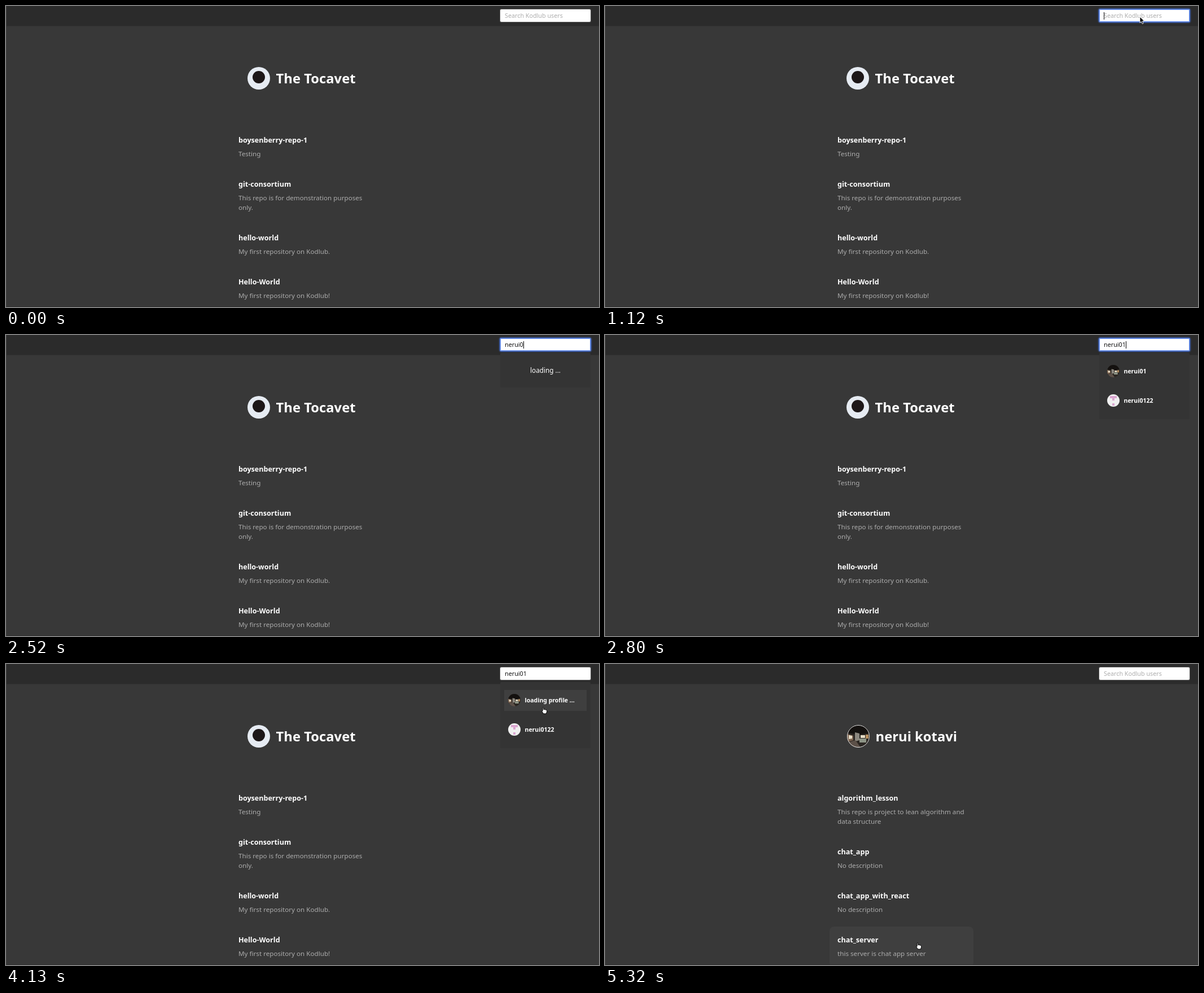
An HTML page for the animation above (5.39 s loop, 1051 by 533 pixels).

```html
<!DOCTYPE html>
<html lang="en">
<head>
<meta charset="utf-8">
<title>User search</title>
<style>
  * { box-sizing: border-box; }
  html, body { margin: 0; width: 100%; height: 100%; overflow: hidden; background: #383838; }
  #stage { position: relative; width: 1051px; height: 533px; overflow: hidden; background: #383838;
    color: #fff; font: 11.65px/17px "Noto Sans", "Open Sans", sans-serif; white-space: nowrap; }
  #stage::after { content: ""; position: absolute; inset: 0; border: solid #424242; border-width: 0 0 0 1px;
    box-shadow: inset 0 -1px #2f2f2f; }
  [hidden] { display: none !important; }
  .abs, header, h1, .face, .list, .search, .drop, .row { position: absolute; }

  header { left: 0; top: 0; width: 100%; height: 35px; background: #2b2b2b; box-shadow: 0 1px 1px rgba(0, 0, 0, .12); }
  h1 { margin: 0; top: 108px; font-size: 23.8px; line-height: 40px; font-weight: 700; }
  .face { top: 108px; width: 40px; height: 40px; }

  .list { left: 398px; top: 214px; width: 255px; }
  .repo { padding: 15px 14px 16px; margin-bottom: 6px; border-radius: 8px; color: #acacac; }
  .repo b { display: block; margin-bottom: 7px; color: #fff; font-size: 12.55px; }
  .repo p { position: relative; top: -.5px; margin: 0; }
  .hover { background: #3f3f3f; }

  .search { left: 876px; top: 6px; width: 160px; height: 22px; padding-left: 8px; border-radius: 2px;
    background: #fff; box-shadow: 0 0 0 1px rgba(255, 255, 255, .25); color: #111; font-size: 10.75px; line-height: 22px; }
  .search.focus { box-shadow: 0 0 0 1px #4a74d8, 0 0 2px 2px rgba(74, 116, 216, .6), inset 0 0 0 1px #6f93e6; }
  .hint { left: 8px; color: #adadad; }
  #caret { display: inline-block; width: 1px; height: 13px; vertical-align: -3px; background: #000; }

  .drop { left: 876px; top: 32px; width: 160px; border-radius: 2px; background: #343434; }
  #wait { height: 61px; line-height: 61px; text-align: center; font-size: 11.75px; }
  #found { height: 117px; }
  .row { left: 7px; width: 146px; height: 37px; padding-left: 36.5px; font-size: 10.5px; line-height: 36px; font-weight: 700; }
  .row svg { position: absolute; left: 7px; top: 7px; width: 22px; height: 22px; }
  #cursor { left: 0; top: 0; width: 14px; height: 18px; overflow: visible; z-index: 5; }
</style>
</head>
<body>
<svg width="0" height="0" style="position:absolute">
  <clipPath id="disc"><circle cx="20" cy="20" r="20"/></clipPath>
  <symbol id="street" viewBox="0 0 40 40">
    <g clip-path="url(#disc)">
      <path fill="#2b2622" d="M0 0h40v40H0z"/>
      <path fill="#14110f" d="M0 0h40v14L22 17 0 14z"/>
      <path fill="#8b877e" d="M14 13l8 2v12l-8 2z"/>
      <path fill="#7d6450" d="M0 16l11 3v8L0 30z"/>
      <path fill="#e6dcc6" d="M3 18l6 1v5l-6 1zM24 18h8v5h-8z"/>
      <path fill="#8d9486" d="M22 24h12v7H22z"/>
      <path fill="#b9905f" d="M33 17h5v7h-5z"/>
      <path fill="#5c5048" d="M0 31l15-4 9 13H0z"/>
    </g>
  </symbol>
</svg>

<div id="stage">
  <header></header>

  <main id="before">
    <svg class="face" style="left:428px" viewBox="0 0 40 40">
      <circle cx="20" cy="20" r="20" fill="#e6ebf2"/><circle cx="20" cy="18" r="11" fill="#1d1718"/>
    </svg>
    <h1 style="left:478.5px">The Tocavet</h1>
    <div class="list">
      <div class="repo"><b>boysenberry-repo-1</b><p>Testing</p></div>
      <div class="repo"><b>git-consortium</b><p>This repo is for demonstration purposes<br>only.</p></div>
      <div class="repo"><b>hello-world</b><p>My first repository on Kodlub.</p></div>
      <div class="repo"><b>Hello-World</b><p>My first repository on Kodlub!</p></div>
    </div>
  </main>

  <main id="after" hidden>
    <svg class="face" style="left:428.5px" viewBox="0 0 40 40">
      <use href="#street" width="40" height="40"/><circle cx="20" cy="20" r="19.5" fill="none" stroke="#e4e4e4"/>
    </svg>
    <h1 style="left:479.5px">nerui kotavi</h1>
    <div class="list">
      <div class="repo"><b>algorithm_lesson</b><p>This repo is project to lean algorithm and<br>data structure</p></div>
      <div class="repo"><b>chat_app</b><p>No description</p></div>
      <div class="repo"><b>chat_app_with_react</b><p>No description</p></div>
      <div class="repo"><b>chat_server</b><p>this server is chat app server</p></div>
    </div>
  </main>

  <div class="search" id="search"><span class="abs hint" id="hint">Search Kodlub users</span><span id="typed"></span><i id="caret"></i></div>

  <div class="drop" id="wait" hidden>loading ...</div>
  <div class="drop" id="found" hidden>
    <div class="row" style="top:14px"><svg><use href="#street" width="22" height="22"/></svg><span id="pick"></span></div>
    <div class="row" style="top:66px">
      <svg viewBox="0 0 22 22"><circle cx="11" cy="11" r="11" fill="#f0f0f0"/><path fill="#dba6d0" d="M5 3h12v4h-4v4H9V7H5zM9 16h4v4H9z"/></svg>nerui0122
    </div>
  </div>

  <svg class="abs" id="cursor" stroke-linejoin="round">
    <path id="arrow" fill="#000" stroke="#fff" stroke-width=".9" d="M0 0V10.8L2.5 8.5 4.3 12.6 6.2 11.8 4.5 7.8H8Z"/>
    <path id="hand" fill="#fff" stroke="#000" d="M-.9 2Q0 .4 .9 2V5.6Q2 4.6 2.8 5.8 4 5 4.6 6.2 6.4 5.6 6.6 7.4V9.6L5.4 13H.6L-2.4 8.6Q-2.6 7-.9 8.2Z"/>
  </svg>
</div>

<script>
const LOOP = 5390, TICK = 70;
const FOCUS = 840, BLUR = 3710, WAIT = 2310, FOUND = 2730, PICK = 4060, SWAP = 4410, BLINK = 490;
const word = "nerui01";
const keys = [1470, 1610, 1680, 1820, 2030, 2450, 2590];

// pointer stops: time, x, y
const path = [
  [70, 960, 13], [210, 954, 18], [350, 954, 18], [630, 948, 19], [3010, 948, 19], [3640, 952, 75],
  [4200, 952, 75], [4410, 779, 118], [4550, 779, 118], [4620, 704, 147], [4760, 608, 187],
  [4970, 608, 187], [5040, 592, 285], [5180, 560, 477], [5250, 560, 477], [5320, 554, 492]
];

const $ = id => document.getElementById(id);
const show = (id, on) => { $(id).hidden = !on; };
const targets = [...document.querySelectorAll(".repo, .row")];

function pointer(t) {
  const i = path.findIndex(p => p[0] > t);
  if (i < 1) return path[i < 0 ? path.length - 1 : 0].slice(1);
  const [t0, x0, y0] = path[i - 1], [t1, x1, y1] = path[i];
  const k = (t - t0) / (t1 - t0);
  return [x0 + (x1 - x0) * k, y0 + (y1 - y0) * k];
}

function inside(el, x, y) {
  const r = el.getBoundingClientRect();
  return x >= r.left && x < r.right && y >= r.top && y < r.bottom;
}

function render(t) {
  const count = t < SWAP ? keys.filter(k => k <= t).length : 0;
  const focus = t >= FOCUS && t < BLUR;
  const lastKey = count ? keys[count - 1] : FOCUS;

  show("before", t < SWAP);
  show("after", t >= SWAP);
  show("wait", t >= WAIT && t < FOUND);
  show("found", t >= FOUND && t < SWAP);
  show("hint", !count);
  $("typed").textContent = word.slice(0, count);
  $("pick").textContent = t < PICK ? word : "loading profile ...";
  $("search").classList.toggle("focus", focus);
  show("caret", focus && Math.floor((t - lastKey) / BLINK) % 2 === 0);

  const [x, y] = pointer(t);
  const visible = t >= TICK && (t < keys[0] || t >= 3010);
  let over = false;
  for (const el of targets) {
    const hit = visible && inside(el, x, y);
    el.classList.toggle("hover", hit);
    over = over || hit;
  }
  $("cursor").style.display = visible ? "" : "none";
  $("cursor").style.transform = `translate(${x}px, ${y}px)`;
  $("arrow").style.display = over ? "none" : "";
  $("hand").style.display = over ? "" : "none";
}

// the screen refreshes once per tick
const start = performance.now();
function frame() {
  const t = (performance.now() - start) % LOOP;
  render(Math.floor(t / TICK) * TICK);
  requestAnimationFrame(frame);
}
frame();
</script>
</body>
</html>
```
